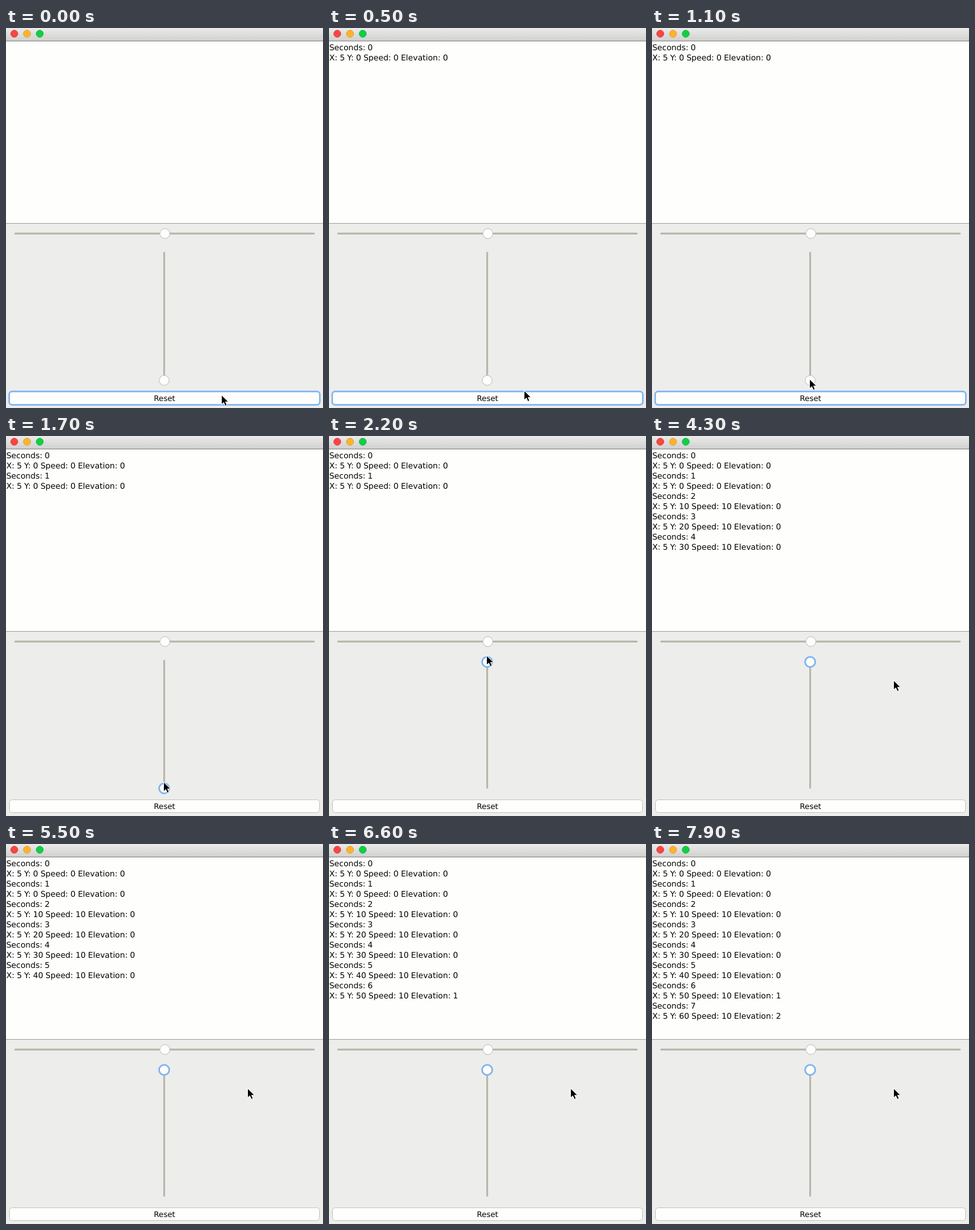
An HTML page with a canvas that plays this animation: 498 px wide and 598 px high, repeating every 8 s.

```html
<!DOCTYPE html>
<html lang="en">
<head>
<meta charset="utf-8">
<title>Speed and elevation</title>
<style>
  html, body { margin: 0; width: 100%; height: 100%; overflow: hidden; background: #ededec; }
  canvas { display: block; }
</style>
</head>
<body>
<canvas id="stage" width="498" height="598"></canvas>
<script>
const ctx = document.getElementById("stage").getContext("2d");
const LOOP = 8000;
const STEP = 100;
const FOCUS_AT = 1700;
const TOP = 355.5, BOTTOM = 554.5;
const PANEL = "#ededec", PAPER = "#fefefd", RING = "#7fb3f0";

// Pointer path: time, x, y of the tip
const pointerPath = [
  [200, 338, 577], [900, 257, 559], [1100, 247, 552], [1600, 247, 552],
  [1700, 247, 544], [2200, 247, 345], [2300, 247, 345], [2600, 379, 384]
];

const smooth = u => u * u * (3 - 2 * u);
const clamp = u => Math.min(1, Math.max(0, u));

function pointerAt(t) {
  let [, x, y] = pointerPath[0];
  for (let i = 1; i < pointerPath.length; i++) {
    const [t0, x0, y0] = pointerPath[i - 1];
    const [t1, x1, y1] = pointerPath[i];
    if (t <= t0) break;
    const u = smooth(clamp((t - t0) / (t1 - t0)));
    x = x0 + (x1 - x0) * u;
    y = y0 + (y1 - y0) * u;
  }
  return [Math.round(x), Math.round(y)];
}

function rect(x, y, w, h, fill) {
  ctx.fillStyle = fill;
  ctx.fillRect(x, y, w, h);
}

function disc(x, y, r, fill, stroke, width = 1) {
  ctx.beginPath();
  ctx.arc(x, y, r, 0, Math.PI * 2);
  ctx.fillStyle = fill;
  ctx.fill();
  ctx.lineWidth = width;
  ctx.strokeStyle = stroke;
  ctx.stroke();
}

function roundBox(x, y, w, h, r, stroke, width, fill) {
  ctx.beginPath();
  ctx.roundRect(x, y, w, h, r);
  ctx.fillStyle = fill;
  ctx.fill();
  ctx.lineWidth = width;
  ctx.strokeStyle = stroke;
  ctx.stroke();
}

function text(str, x, y, size, align = "left") {
  ctx.font = `${size}px "DejaVu Sans", sans-serif`;
  ctx.textAlign = align;
  ctx.fillStyle = "#000";
  ctx.fillText(str, x, y);
}

function titleBar() {
  const shade = ctx.createLinearGradient(0, 0, 0, 20);
  shade.addColorStop(0, "#ebebea");
  shade.addColorStop(1, "#d0d0cf");
  rect(0, 0, 498, 20, shade);
  rect(0, 20, 498, 1, "#858583");
  disc(13, 9, 5.5, "#fc4444", "#e04040");
  disc(33, 9, 5.5, "#fdb42a", "#e0a02c");
  disc(53, 9, 5.5, "#10cf46", "#16b840");
}

function log(t) {
  rect(0, 21, 498, 286, PAPER);
  rect(0, 307, 498, 1, "#a4a4a0");
  for (let s = 0; 300 + s * 1000 <= t; s++) {
    const y = 35 + s * 32;
    const distance = Math.max(0, s - 1) * 10;
    const speed = s > 1 ? 10 : 0;
    const elevation = Math.max(0, s - 5);
    text(`Seconds: ${s}`, 0.4, y, 12.5);
    text(`X: 5 Y: ${distance} Speed: ${speed} Elevation: ${elevation}`, 0.4, y + 16, 12.5);
  }
}

function knob(x, y, focused) {
  if (focused) disc(x, y, 8, PAPER, RING, 2.6);
  else disc(x, y, 7.8, PAPER, "#bdbdb2");
}

function track(x, y, w, h) {
  ctx.beginPath();
  ctx.roundRect(x, y, w, h, 1.5);
  ctx.fillStyle = "#b9b9ac";
  ctx.fill();
}

function sliders(t, pointerY) {
  const focused = t >= FOCUS_AT;
  track(13, 322, 472, 3);
  knob(249.5, 323.5, false);
  track(247, 352, 3, 203);
  const y = focused ? BOTTOM + pointerY - 544 : BOTTOM;
  knob(248.5, t >= 2200 ? TOP : Math.min(BOTTOM, Math.max(TOP, y)), focused);
}

function button(focused) {
  if (focused) {
    roundBox(5, 572, 488, 21, 4.5, RING, 2.4, PAPER);
  } else {
    roundBox(5.5, 572.5, 487, 20, 4, "#c6c6bf", 1, PAPER);
  }
  text("Reset", 249, 587, 12, "center");
}

function pointer(x, y) {
  const outline = [[0, 0], [0, 15], [3.5, 11.8], [6, 17.2], [8.6, 16], [6.3, 10.8], [11, 10.8]];
  ctx.beginPath();
  outline.forEach(([dx, dy]) => ctx.lineTo(x + 0.5 + dx, y + 0.5 + dy));
  ctx.closePath();
  ctx.lineJoin = "round";
  ctx.lineWidth = 1;
  ctx.strokeStyle = "#fff";
  ctx.fillStyle = "#000";
  ctx.fill();
  ctx.stroke();
}

function draw(t) {
  const [px, py] = pointerAt(t);
  rect(0, 0, 498, 598, PANEL);
  titleBar();
  log(t);
  sliders(t, py);
  button(t < FOCUS_AT);
  pointer(px, py);
}

ctx.textRendering = "geometricPrecision";
ctx.wordSpacing = "-0.25px";
const start = performance.now();

function frame() {
  const t = (performance.now() - start) % LOOP;
  draw(Math.floor(t / STEP) * STEP);
  requestAnimationFrame(frame);
}
frame();
</script>
</body>
</html>
```
